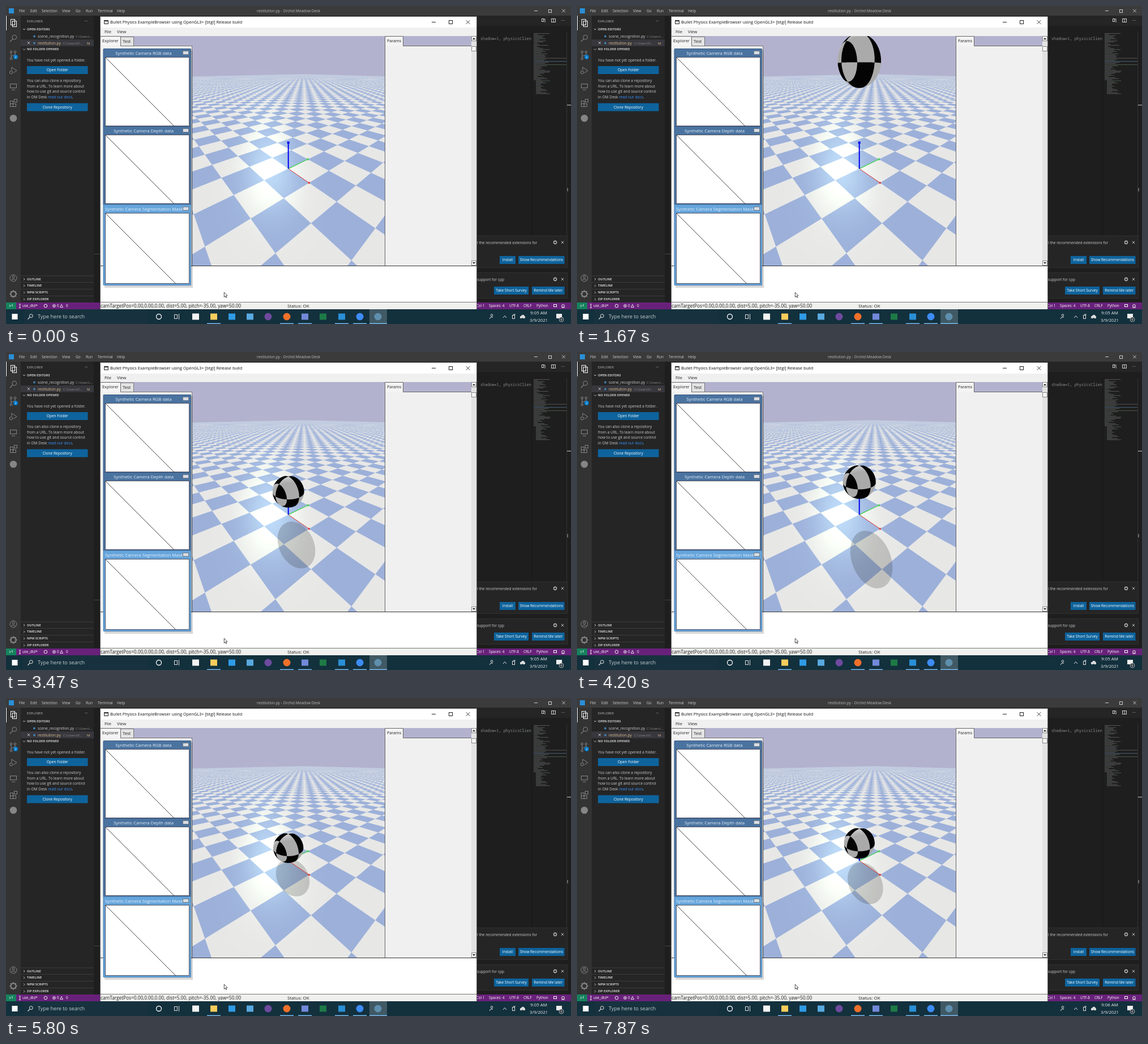
Animation, 998 px wide and 561 px high, one loop 7940 ms. Source, as an HTML page with a canvas:

```html
<!DOCTYPE html>
<html lang="en">
<head>
<meta charset="utf-8">
<title>Restitution</title>
<style>
html, body { margin: 0; width: 100%; height: 100%; overflow: hidden; background: #1e1e1e }
canvas { display: block }
</style>
</head>
<body>
<canvas id="stage" width="998" height="561"></canvas>
<script>
const stage = document.getElementById('stage').getContext('2d');
const base = layer(998, 561);
let g = base;

function layer(w, h) {
  const c = document.createElement('canvas');
  c.width = w; c.height = h;
  return c.getContext('2d');
}

// ---- drawing helpers ----
const SANS = '"Open Sans", "Noto Sans", sans-serif', MONO = '"Noto Sans Mono", monospace';

function rect(x, y, w, h, fill) { g.fillStyle = fill; g.fillRect(x, y, w, h); }
function frame(x, y, w, h, color) {
  g.strokeStyle = color; g.lineWidth = 1; g.strokeRect(x + .5, y + .5, w - 1, h - 1);
}
function dot(x, y, r, fill) {
  g.fillStyle = fill; g.beginPath(); g.arc(x, y, r, 0, 7); g.fill();
}
function ring(x, y, r, color, w = 1) {
  g.strokeStyle = color; g.lineWidth = w; g.beginPath(); g.arc(x, y, r, 0, 7); g.stroke();
}
function line(color, w, ...p) {
  g.strokeStyle = color; g.lineWidth = w; g.beginPath();
  for (let i = 0; i < p.length; i += 2) g.lineTo(p[i], p[i + 1]);
  g.stroke();
}
// returns the x where the text ends
function text(s, x, mid, size, color, { bold = 400, align = 'left', font = SANS } = {}) {
  g.font = `${bold} ${size}px ${font}`;
  g.textAlign = align; g.fillStyle = color;
  g.fillText(s, x, mid + size * .35);
  return x + g.measureText(s).width;
}
function button(s, x, y, w, h) {
  rect(x, y, w, h, '#0e639c');
  text(s, x + w / 2, y + h / 2, 6.6, '#fff', { align: 'center' });
}
function cross(x, y, r, color, w = .9) {
  line(color, w, x - r, y - r, x + r, y + r);
  line(color, w, x - r, y + r, x + r, y - r);
}
function gear(x, y, r, color) {
  ring(x, y, r * .7, color, r * .3);
  for (let a = 0; a < 6.2; a += Math.PI / 4)
    line(color, r * .35, x + r * .7 * Math.cos(a), y + r * .7 * Math.sin(a), x + r * Math.cos(a), y + r * Math.sin(a));
}
function search(x, y, r, color) {
  ring(x + r * .3, y - r * .3, r * .65, color);
  line(color, 1.1, x - r * .2, y + r * .2, x - r, y + r);
}

// ---- camera: distance 5, pitch -35, yaw 50, 90 degree view ----
const RAD = Math.PI / 180, S = Math.sin(35 * RAD), C = Math.cos(35 * RAD);
const FX = -Math.sin(50 * RAD), FY = Math.cos(50 * RAD);
const CX = 498.7, CY = 287, FOCAL = 248.5, EYE = [-5 * C * FX, -5 * C * FY, 5 * S];
const LIGHT = [-.707, .424, .566];
const VIEW = { x: 329, y: 53, w: 341, h: 405 };

function project(x, y, z) {
  const fwd = FX * x + FY * y, side = FY * x - FX * y, depth = 5 + C * fwd - S * z;
  return [CX + FOCAL * side / depth, CY - FOCAL * (S * fwd + C * z) / depth];
}
function ray(px, py) {
  const a = (px - CX) / FOCAL, b = (CY - py) / FOCAL, h = C + b * S;
  return [FY * a + FX * h, -FX * a + FY * h, b * C - S];
}

const SKY = [179, 178, 206], BLUE = [156, 176, 217], WHITE = [231, 231, 230];

function floorColor(d) {
  if (d[2] >= 0) return SKY;
  const t = -EYE[2] / d[2], x = EYE[0] + t * d[0], y = EYE[1] + t * d[1];
  if (Math.abs(x) > 100 || Math.abs(y) > 100) return SKY;
  const far = Math.min(1, Math.max(0, (t - 25) / 50));
  const odd = (Math.floor(x) + Math.floor(y)) & 1;
  const mix = odd ? 1 - far / 2 : far / 2;
  return WHITE.map((v, i) => v + (BLUE[i] - v) * mix);
}
function glare(d) {
  if (d[2] >= 0) return 0;
  const len = Math.hypot(...d), h = LIGHT.map((v, i) => v - d[i] / len);
  return Math.pow(h[2] / Math.hypot(...h), 85);
}
function paintFloor() {
  const img = g.createImageData(VIEW.w, VIEW.h), n = 3;
  for (let y = 0, o = 0; y < VIEW.h; y++) for (let x = 0; x < VIEW.w; x++, o += 4) {
    const sum = [0, 0, 0];
    for (let k = 0; k < n * n; k++) {
      const c = floorColor(ray(VIEW.x + x + (k % n + .5) / n, VIEW.y + y + ((k / n | 0) + .5) / n));
      for (let i = 0; i < 3; i++) sum[i] += c[i] / (n * n);
    }
    const s = glare(ray(VIEW.x + x + .5, VIEW.y + y + .5));
    img.data.set([sum[0] + 34 * s, sum[1] + 44 * s, sum[2] + 32 * s, 255], o);
  }
  g.putImageData(img, VIEW.x, VIEW.y);
}

// ---- editor behind ----
function paintEditor() {
  rect(0, 0, 998, 561, '#1e1e1e');
  rect(0, 0, 998, 17, '#3b3b3c');
  rect(5, 4, 9, 9, '#2a8fd6');
  [['File', 23], ['Edit', 43], ['Selection', 63], ['View', 99], ['Go', 123], ['Run', 141], ['Terminal', 162], ['Help', 196]]
    .forEach(([s, x]) => text(s, x, 8.5, 6.6, '#ccc'));
  text('restitution.py - Orchid Meadow Desk', 499, 8.5, 6.6, '#bbb', { align: 'center' });
  line('#ccc', 1, 933, 8.5, 939, 8.5);
  frame(958, 6, 6, 6, '#ccc');
  cross(985, 8.5, 2.8, '#ccc');

  rect(0, 17, 26, 506, '#333');
  rect(26, 17, 129, 506, '#252526');
  rect(0, 17, 1, 26, '#fff');
  const dim = '#858585';
  frame(8, 23, 8, 11, '#fff'); frame(11, 26, 8, 11, '#fff');
  search(13, 57, 6, dim);
  line(dim, 1, 9, 82, 9, 92); line(dim, 1, 9, 89, 16, 86, 16, 83);
  ring(9, 81, 1.8, dim); ring(16, 81, 1.8, dim); ring(9, 93, 1.8, dim);
  dot(17, 90, 4, '#007acc');
  text('2', 17, 90, 5.5, '#fff', { align: 'center' });
  line(dim, 1, 10, 113, 10, 108, 19, 114, 13, 118); ring(9, 117, 2.6, dim);
  frame(7, 137, 12, 8, dim); line(dim, 1, 10, 148, 16, 148);
  frame(7, 167, 6, 6, dim); frame(7, 172, 6, 6, dim); frame(12, 172, 6, 6, dim); frame(14, 164, 6, 6, dim);
  dot(13, 198, 6.3, dim);
  ring(13, 480, 6, dim); ring(13, 478, 2, dim); line(dim, 1, 9, 484, 11, 482, 15, 482, 17, 484);
  gear(13, 508, 6.5, dim);

  text('EXPLORER', 37, 27, 5.8, '#bbb');
  text('···', 139, 27, 7, '#ccc');
  const head = (s, y, open) => {
    if (open) line('#ccc', .9, 30, y - 1, 32, y + 1, 34, y - 1);
    else line('#ccc', .9, 31, y - 2, 33, y, 31, y + 2);
    text(s, 37, y, 5.6, '#ccc', { bold: 700 });
  };
  rect(26, 59, 129, 12, '#37373d');
  head('OPEN EDITORS', 41, true);
  dot(50, 53.5, 2, '#3f7eaa'); dot(50, 65.5, 2, '#3f7eaa');
  text('scene_recognition.py', 56, 53.5, 6.6, '#ccc');
  text('C:\\Users\\...', 123, 53.5, 5.9, '#8b8b8b');
  cross(40, 65, 2.2, '#ccc');
  text('restitution.py', 56, 65.5, 6.6, '#e2c08d');
  text('C:\\Users\\P...', 101, 65.5, 5.9, '#8b8b8b');
  text('M', 143, 65.5, 6, '#e2c08d');
  head('NO FOLDER OPENED', 76.5, true);
  text('You have not yet opened a folder.', 37, 95.5, 6.64, '#ccc');
  button('Open Folder', 37, 106, 107.5, 14);
  text('You can also clone a repository', 37, 132, 6.64, '#ccc');
  text('from a URL. To learn more about', 37, 141.5, 6.64, '#ccc');
  text('how to use git and source control', 37, 151, 6.64, '#ccc');
  const link = text('in OM Desk ', 37, 160.5, 6.64, '#ccc');
  text('.', text('read our docs', link, 160.5, 6.64, '#3794ff'), 160.5, 6.64, '#ccc');
  button('Clone Repository', 37, 171.5, 107.5, 14);
  [['OUTLINE', 482], ['TIMELINE', 493.5], ['NPM SCRIPTS', 505.5], ['ZIP EXPLORER', 517.5]].forEach(([s, y]) => {
    line('#3c3c3c', 1, 26, y - 6, 155, y - 6);
    head(s, y, false);
  });
  line('#444', 1, 155, 437.5, 167, 437.5);

  rect(831, 17, 167, 18, '#252526');
  frame(946, 22, 4, 6, '#ccc'); line('#ccc', 1, 950, 23, 952, 23, 952, 29);
  frame(963, 22, 8, 7, '#ccc'); line('#ccc', 1, 967, 22, 967, 29);
  text('···', 984, 25.5, 8, '#ccc', { align: 'center' });
  text('shadow=1, physicsClien', 838, 58, 6.8, '#85898c', { font: MONO });
  rect(928, 46, 1, 360, '#171717');
  for (let y = 48, i = 1; y < 155; y += 1.9, i++) {
    const r = Math.abs(Math.sin(i * 12.9898) * 43758.5453) % 1;
    const long = i > 22 && i < 33 && i % 3 === 0;
    rect(932 + (i > 44 ? 4 : 0), y, long ? 50 + r * 9 : 6 + r * 24, .8, i % 5 ? '#626265' : '#566856');
  }
  rect(932, 97, 58, 1, '#3d566b');
  rect(990, 46, 1, 390, '#333');
  rect(991, 174, 7, 1.5, '#999');
  rect(991, 321, 2, 6, '#666');

  const toast = (y, h) => {
    rect(831, y, 161, h, '#252526');
    frame(830, y, 162, h, '#303031');
    gear(970, y + 12, 3.4, '#ccc'); cross(983, y + 12, 2.2, '#ccc');
  };
  toast(405, 57);
  text('l the recommended extensions for', 832, 418, 6.64, '#ccc');
  button('Install', 872, 441, 28, 14);
  button('Show Recommendations', 905, 441, 81.5, 14);
  toast(470, 46);
  text('support for cpp', 832, 482.5, 6.64, '#ccc');
  button('Take Short Survey', 862, 495, 61, 14);
  button('Remind Me later', 929, 495, 57.5, 14);

  rect(0, 523, 998, 12, '#68217a');
  rect(0, 523, 18, 12, '#16825d');
  line('#fff', .9, 6, 527, 8, 529, 6, 531); line('#fff', .9, 12, 526, 10, 528, 12, 530);
  ring(24.5, 526.5, 1, '#fff', .8); ring(24.5, 532, 1, '#fff', .8); line('#fff', .8, 24.5, 527.5, 24.5, 531);
  const status = (s, x) => text(s, x, 529, 6.3, '#fff');
  status('use_dtd*', 29);
  ring(70, 529, 2.8, '#fff', .9);
  ring(85, 529, 2.5, '#fff', .8); cross(85, 529, 1, '#fff', .7); status('0', 90);
  line('#fff', .8, 98, 526.5, 95.5, 531.5, 100.5, 531.5, 98, 526.5); status('0', 106);
  status('1, Col 1', 824); status('Spaces: 4', 853); status('UTF-8', 889); status('CRLF', 914); status('Python', 937);
  frame(967, 526, 6, 5, '#fff');
  ring(984, 529, 2.4, '#fff', .9); line('#fff', .9, 981, 532, 987, 532);
}

// ---- physics window ----
function paintWindow() {
  rect(166, 18, 666, 517, '#6a6a6a');
  rect(167, 19, 664, 19, '#fff');
  rect(173, 25, 8, 7, '#333'); rect(174, 27, 6, 4, '#ddd');
  text('Bullet Physics ExampleBrowser using OpenGL3+ [btgl] Release build', 184, 28.5, 7.4, '#111');
  line('#222', 1, 752, 28.5, 759, 28.5);
  frame(782, 25, 7, 7, '#222');
  cross(816, 28.5, 3.3, '#222');
  rect(167, 38, 664, 15, '#f0f0f0');
  text('File', 174, 45.5, 7.5, '#222'); text('View', 196, 45.5, 7.5, '#222');
  rect(167, 53, 664, 405, '#b3b2ce');
  paintFloor();

  rect(167, 70, 162, 388, '#f0f0f0');
  frame(166, 70, 163, 389, '#777');
  rect(167, 53, 35, 18, '#f4f4f4'); line('#666', 1, 167, 53.5, 202.5, 53.5, 202.5, 70);
  rect(203, 55, 23, 15, '#e4e4e4'); line('#777', 1, 203, 54.5, 225.5, 54.5, 225.5, 70);
  text('Explorer', 170, 61.5, 7.4, '#222'); text('Test', 206, 62.5, 7.6, '#222');

  rect(670, 70, 152, 388, '#f0f0f0');
  rect(670, 53, 31, 18, '#f4f4f4');
  line('#666', 1, 669.5, 458, 669.5, 53.5, 701.5, 53.5, 701.5, 70.5, 822, 70.5);
  text('Params', 673, 61.5, 7.2, '#222');
  rect(822, 53, 9, 405, '#e3e3e3');
  [53, 71, 449].forEach(y => { rect(822, y, 9, 9, '#f5f5f5'); frame(822, y, 9, 9, '#888'); });
  g.fillStyle = '#222';
  [[59, -1], [452, 1]].forEach(([y, d]) => {
    g.beginPath(); g.moveTo(824, y); g.lineTo(829, y); g.lineTo(826.5, y + d * 3); g.fill();
  });

  rect(167, 458, 664, 65, '#fff');
  line('#333', 1, 167, 458.5, 831, 458.5);
  rect(167, 522, 664, 13, '#f0f0ee');
  line('#777', 1, 167, 522.5, 831, 522.5);
  text('camTargetPos=0.00,0.00,0.00, dist=5.00, pitch=-35.00, yaw=50.00', 167, 529, 8.27, '#222');
  text('Status: OK', 497, 529, 8, '#222');

  rect(174, 78, 156, 419, 'rgba(0,0,0,.16)');
  const panel = (title, y, h, fill, x, align) => {
    g.fillStyle = fill; g.beginPath(); g.roundRect(171.5, y, 155.5, h, 2); g.fill();
    frame(172, y, 155, h, 'rgba(20,45,80,.3)');
    g.save(); g.beginPath(); g.rect(173, y, 139, 15); g.clip();
    text(title, x, y + 8, 7.8, '#e8f0f8', { align });
    g.restore();
    rect(312, y + 4, 11, 7, '#d9dde2'); frame(312, y + 4, 11, 7, '#707c8c');
    const size = h - 18;
    rect(175, y + 15, 149, size, '#fff');
    frame(175, y + 15, 149, size, '#556');
    line('#333', .9, 175.5, y + 15.5, 175 + size, y + 15 + size);
  };
  panel('Synthetic Camera RGB data', 75, 140, '#4a73a0', 243, 'center');
  panel('Synthetic Camera Depth data', 212, 140, '#4a73a0', 243, 'center');
  panel('Synthetic Camera Segmentation Mask', 350, 143, '#66a5dc', 175, 'left');

  g.fillStyle = '#fff'; g.strokeStyle = '#222'; g.lineWidth = .8;
  g.beginPath();
  [[0, 0], [0, 8.5], [2, 6.8], [3.4, 9.6], [4.6, 9], [3.3, 6.3], [5.8, 6]].forEach(([x, y]) => g.lineTo(385.3 + x, 505 + y));
  g.closePath(); g.fill(); g.stroke();
}

function paintTaskbar() {
  rect(0, 535, 998, 26, '#13303d');
  rect(31, 535, 220, 26, '#17323e');
  rect(10.5, 543, 10, 10, '#fff');
  search(43, 548, 4.5, '#eee');
  text('Type here to search', 56, 548, 9.1, '#c5cdd1');
  ring(270, 548, 4.5, '#fff', 1.3);
  frame(297, 544, 6, 8, '#ddd'); line('#ddd', 1, 305.5, 543, 305.5, 553);
  rect(642, 535, 31, 26, '#405964');
  [[335, '#f3f3f3'], [367, '#f7cd5b'], [399, '#2f9be6'], [431, '#58a9e0'], [528, '#7289da'], [560, '#1d7a45'], [593, '#2a8fd6']]
    .forEach(([x, c]) => rect(x - 6, 542.5, 12, 11, c));
  [[463, '#6e4a9e'], [496, '#f0702a'], [625, '#3d8cf5'], [657, '#5f8fae']].forEach(([x, c]) => dot(x, 548, 6.5, c));
  [[355, 24], [484, 24], [516, 24], [581, 24], [613, 24], [642, 31]].forEach(([x, w]) => rect(x, 559.5, w, 1.5, '#76b9ed'));
  ring(858, 545.5, 1.8, '#ddd'); line('#ddd', 1, 854, 552, 856, 549, 860, 549);
  line('#ddd', 1, 878, 550, 881, 546.5, 884, 550);
  frame(894, 545, 5, 7, '#ddd'); line('#ddd', 1, 896, 544, 900, 544);
  dot(910, 549, 2.2, '#ddd'); dot(913, 547.5, 2.8, '#ddd'); dot(915, 549, 2.2, '#ddd');
  text('3/9/2021', 941, 554, 7.7, '#eee', { align: 'center' });
  rect(972, 543, 10, 8, '#eee');
  dot(981, 553, 4, '#25333a'); ring(981, 553, 4, '#ccc', .8);
  text('9', 981, 553, 5.8, '#fff', { align: 'center' });
}

// ---- ball ----
const APPEAR = 1.45, RELEASE = 1.63, RADIUS = .5;
// each arc: start, end, half the acceleration
const ARCS = [[-.373, 3.633, .623], [3.633, 5.784, .784], [5.784, 7.576, .623], [7.576, 8.908, .623]];

function height(t) {
  t = Math.max(t, RELEASE);
  const [a, b, k] = ARCS.find(arc => t < arc[1]);
  return RADIUS + k * (t - a) * (b - t);
}

function drawShadow(z) {
  const n = Math.hypot(LIGHT[0], LIGHT[1]), slope = n / LIGHT[2];
  const ux = -LIGHT[0] / n, uy = -LIGHT[1] / n, long = RADIUS * Math.hypot(1, slope);
  g.beginPath();
  for (let i = 0; i < 72; i++) {
    const a = i * 5 * RAD, p = z * slope + long * Math.cos(a), q = RADIUS * Math.sin(a);
    g.lineTo(...project(ux * p - uy * q, uy * p + ux * q, 0));
  }
  g.fillStyle = 'rgba(40,40,35,.21)';
  g.fill();
}

function drawAxes() {
  const o = project(0, 0, 0);
  [[[1, 0, 0], '#e03030', 1], [[0, 1, 0], '#4fd060', 1.4], [[0, 0, 1], '#0000f0', 2]].forEach(([p, c, w]) => {
    const [x, y] = project(...p), s = w + 2;
    line(c, w, ...o, x, y);
    rect(x - s / 2, y - s / 2, s, s, c);
  });
}

const BOX_W = 100, BOX_H = 124, ballLayer = layer(BOX_W, BOX_H);

// brightness of the ball along one ray, or -1 for a miss
function ballShade(d, z) {
  const oz = EYE[2] - z;
  const a = d[0] * d[0] + d[1] * d[1] + d[2] * d[2];
  const b = EYE[0] * d[0] + EYE[1] * d[1] + oz * d[2];
  const c = EYE[0] * EYE[0] + EYE[1] * EYE[1] + oz * oz - RADIUS * RADIUS;
  const q = b * b - a * c;
  if (q < 0) return -1;
  const t = (-b - Math.sqrt(q)) / a;
  const x = (EYE[0] + t * d[0]) / RADIUS, y = (EYE[1] + t * d[1]) / RADIUS, h = (oz + t * d[2]) / RADIUS;
  // the poles of the pattern lie on the y axis: quarters around it, bands of 45 degrees along it
  const band = Math.floor(Math.asin(Math.max(-1, Math.min(1, y))) / (Math.PI / 4)) & 1;
  const quarter = (x > 0) === (h > 0) ? 1 : 0;
  if (band !== quarter) return 4;
  return 170 + 78 * Math.max(0, x * LIGHT[0] + y * LIGHT[1] + h * LIGHT[2]);
}

function drawBall(z) {
  const [cx, cy] = project(0, 0, z), x0 = Math.round(cx - BOX_W / 2), y0 = Math.round(cy - BOX_H / 2);
  const img = ballLayer.createImageData(BOX_W, BOX_H), n = 3;
  for (let y = 0, o = 0; y < BOX_H; y++) for (let x = 0; x < BOX_W; x++, o += 4) {
    let sum = 0, hits = 0;
    for (let k = 0; k < n * n; k++) {
      const v = ballShade(ray(x0 + x + (k % n + .5) / n, y0 + y + ((k / n | 0) + .5) / n), z);
      if (v >= 0) { sum += v; hits++; }
    }
    if (hits) {
      const v = sum / hits;
      img.data.set([v, v, v, 255 * hits / (n * n)], o);
    }
  }
  ballLayer.putImageData(img, 0, 0);
  g.drawImage(ballLayer.canvas, x0, y0);
}

paintEditor();
paintWindow();
paintTaskbar();
g = stage;

function draw(now) {
  const t = now / 1000 % 7.94, z = height(t), ball = t >= APPEAR;
  g.drawImage(base.canvas, 0, 0);
  g.save();
  g.beginPath(); g.rect(VIEW.x, VIEW.y, VIEW.w - 1, VIEW.h); g.clip();
  if (ball) drawShadow(z);
  drawAxes();
  if (ball) drawBall(z);
  g.restore();
  text(t < 7.5 ? '9:05 AM' : '9:06 AM', 941, 541.5, 7.9, '#eee', { align: 'center' });
}

const start = performance.now();
(function tick() {
  draw(performance.now() - start);
  requestAnimationFrame(tick);
})();
</script>
</body>
</html>
```
